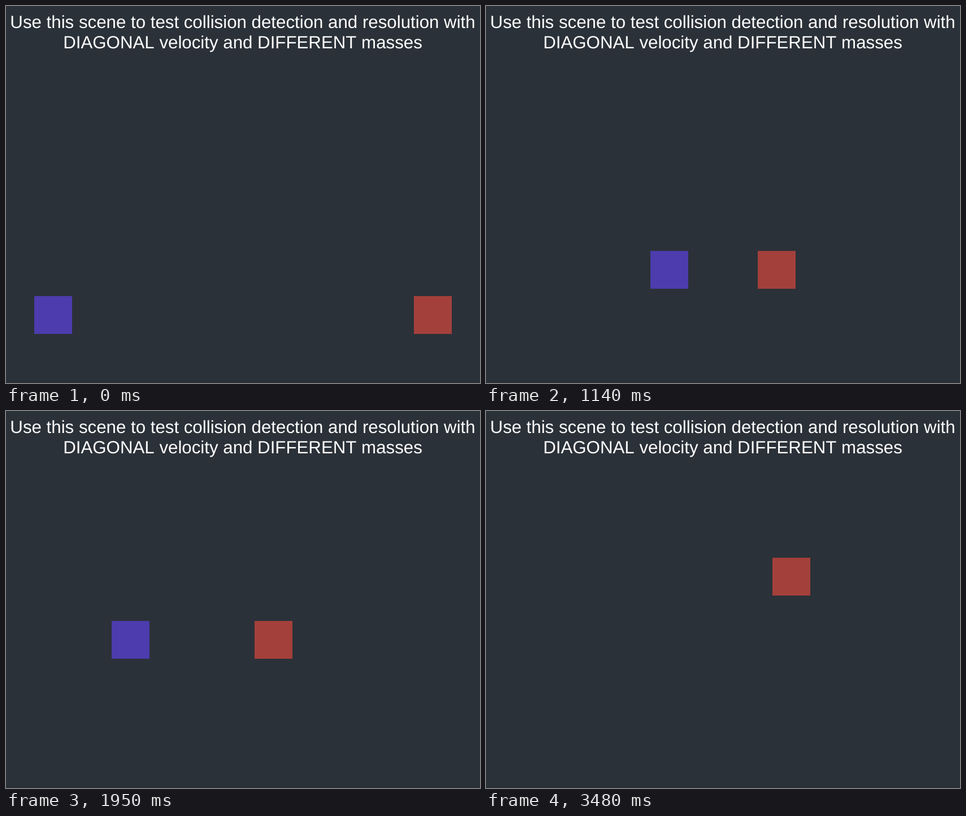
These frames come from a looping animation (839x668 px, 3.51 s). An HTML page:

```html
<!DOCTYPE html>
<html lang="en">
<head>
<meta charset="utf-8">
<title>Collision test</title>
<style>
  html, body { margin: 0; height: 100%; overflow: hidden; background: #2b3138; }
  svg { display: block; }
  text {
    font: 31.25px Arial, "Liberation Sans", sans-serif;
    font-kerning: none;
    text-rendering: geometricPrecision;
    text-anchor: middle;
    fill: #fff;
  }
</style>
</head>
<body>
<svg width="839" height="668">
  <rect y="664" width="839" height="4" fill="#292f36"/>
  <text x="419" y="39">Use this scene to test collision detection and resolution with</text>
  <text x="419" y="75">DIAGONAL velocity and DIFFERENT masses</text>
  <rect id="blue" width="67" height="67" fill="#4c3cad"/>
  <rect id="red" width="67" height="67" fill="#a4403b"/>
</svg>
<script>
const LOOP = 3510, STEP = 30;
const START_Y = 514.2, IMPACT = 102;
const RED_MASS = 2, BOUNCE = 0.8, SPEED = 3;  // blue has mass 1; speeds are relative to the rise

const drift = (SPEED - RED_MASS * SPEED) / (1 + RED_MASS);
const recoil = 2 * SPEED * BOUNCE / (1 + RED_MASS);
const boxes = [
  { el: document.getElementById("blue"), x: 50.2, before: SPEED, after: drift - RED_MASS * recoil },
  { el: document.getElementById("red"), x: 721.7, before: -SPEED, after: drift + recoil }
];

// Steady rise that quickens a little, then eases off
const risenAt = time =>
  0.0685 * time + 0.0081 * Math.max(0, time - 870) - 0.0038 * Math.max(0, time - 1950);

function draw() {
  const time = Math.floor(performance.now() % LOOP / STEP) * STEP;
  const risen = risenAt(time);
  for (const { el, x, before, after } of boxes) {
    const shift = before * Math.min(risen, IMPACT) + after * Math.max(0, risen - IMPACT);
    el.setAttribute("x", Math.round(x + shift));
    el.setAttribute("y", Math.round(START_Y - risen));
  }
  requestAnimationFrame(draw);
}
draw();
</script>
</body>
</html>
```
